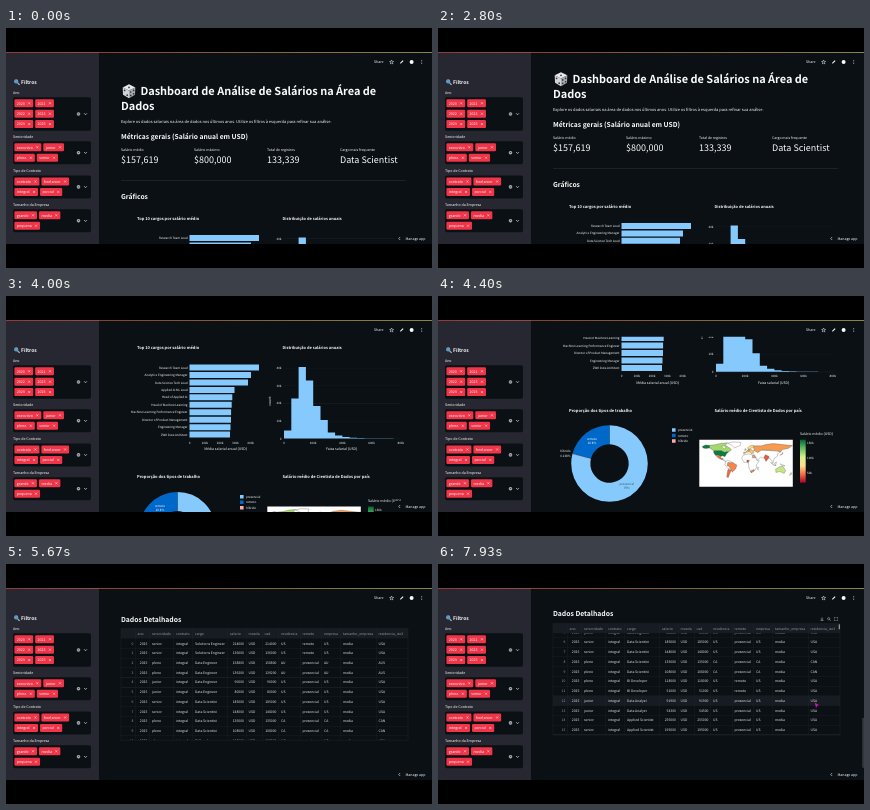
These frames come from a looping animation (426x240 px, 8 s). An HTML page with a canvas:

```html
<!DOCTYPE html>
<html lang="pt">
<head>
<meta charset="utf-8">
<title>Dashboard de Salários</title>
<style>
html, body { margin: 0; width: 100%; height: 100%; overflow: hidden; background: #000; }
canvas { display: block; width: 426px; height: 240px; }
</style>
</head>
<body>
<canvas id="stage"></canvas>
<script>
const W = 426, H = 240, LOOP = 8000, TOP = 24, BOTTOM = 216;
const FONT = '"Noto Sans CJK JP", "Noto Sans CJK SC", "Noto Sans CJK", "Open Sans", sans-serif';
const BG = '#0a1014', SIDE = '#262730', WHITE = '#fafafa', GREY = '#9a9ca5', LINE = '#232930';
const SKY = '#85c9fd', BLUE = '#0068c9', PINK = '#ffabab', RED = '#f03549';

const canvas = document.getElementById('stage');
const dpr = window.devicePixelRatio || 1;
canvas.width = W * dpr;
canvas.height = H * dpr;
const ctx = canvas.getContext('2d');

// Text is laid out at 100px and scaled down, so small sizes keep exact advances.
function setFont(bold) {
  ctx.font = `${bold ? 700 : 400} 100px ${FONT}`;
  ctx.textRendering = 'geometricPrecision';
}
function textWidth(str, size) {
  setFont(false);
  return ctx.measureText(str).width * size / 100;
}
// y is the middle of the capitals
function text(str, x, y, size, { color = WHITE, bold = false, align = 'left', turn = 0 } = {}) {
  ctx.save();
  ctx.translate(x, y);
  ctx.rotate(turn);
  ctx.scale(size / 100, size / 100);
  setFont(bold);
  ctx.textAlign = align;
  ctx.fillStyle = color;
  ctx.fillText(str, 0, 36);
  ctx.restore();
}
function rect(x, y, w, h, color, radius = 0) {
  ctx.fillStyle = color;
  ctx.beginPath();
  ctx.roundRect(x, y, w, h, radius);
  ctx.fill();
}
function circle(x, y, r, color) {
  ctx.fillStyle = color;
  ctx.beginPath();
  ctx.arc(x, y, r, 0, 7);
  ctx.fill();
}
function shape(path, x, y, { fill, stroke, width = 0.6, sx = 1, sy = sx } = {}) {
  ctx.save();
  ctx.translate(x, y);
  ctx.scale(sx, sy);
  const p = new Path2D(path);
  if (fill) { ctx.fillStyle = fill; ctx.fill(p); }
  if (stroke) { ctx.strokeStyle = stroke; ctx.lineWidth = width; ctx.stroke(p); }
  ctx.restore();
}
function clipped(x, y, w, h, draw) {
  ctx.save();
  ctx.beginPath();
  ctx.rect(x, y, w, h);
  ctx.clip();
  draw();
  ctx.restore();
}

// Monotone cubic through [time, value] keys
function track(keys, t) {
  const last = keys.length - 1;
  if (t <= keys[0][0]) return keys[0][1];
  if (t >= keys[last][0]) return keys[last][1];
  const slope = i => (keys[i + 1][1] - keys[i][1]) / (keys[i + 1][0] - keys[i][0]);
  const tangent = i => {
    if (i === 0 || i === last) return 0;
    const a = slope(i - 1), b = slope(i);
    return a * b > 0 ? 2 * a * b / (a + b) : 0;
  };
  const i = keys.findIndex((k, n) => n < last && t < keys[n + 1][0]);
  const [t0, v0] = keys[i], [t1, v1] = keys[i + 1];
  const d = t1 - t0, u = (t - t0) / d, u2 = u * u, u3 = u2 * u;
  return v0 * (2 * u3 - 3 * u2 + 1) + v1 * (3 * u2 - 2 * u3) +
    d * (tangent(i) * (u3 - 2 * u2 + u) + tangent(i + 1) * (u3 - u2));
}
const PAGE_SCROLL = [[2600, 0], [2800, 12], [3530, 69.5], [4400, 205], [5070, 302], [5800, 394.5]];
const TABLE_SCROLL = [[6960, 0], [7200, 9], [7700, 42], [7930, 54.4]];

const FILTERS = [
  { label: 'Ano', y: 65, rows: [['2020', '2021'], ['2022', '2023'], ['2024', '2025']] },
  { label: 'Senioridade', y: 109, rows: [['executivo', 'junior'], ['pleno', 'senior']] },
  { label: 'Tipo de Contrato', y: 143.2, rows: [['contrato', 'freelancer'], ['integral', 'parcial']] },
  { label: 'Tamanho da Empresa', y: 177, rows: [['grande', 'media'], ['pequena']] },
];

function drawSidebar() {
  rect(0, TOP, 93, BOTTOM - TOP, SIDE);
  shape('M1 1 3 3', 10.6, 53.8, { stroke: '#b9bec8', width: 1.2 });
  circle(10.2, 53.4, 2.1, '#8fa3b5');
  circle(10.2, 53.4, 1.5, '#3f9fe0');
  text('Filtros', 15, 54, 5, { bold: true });
  for (const { label, y, rows } of FILTERS) {
    const height = rows.length * 10.5 + 2, mid = y + 4.2 + height / 2;
    text(label, 7, y, 3.57);
    rect(7, y + 4.2, 78, height, BG, 2);
    rows.forEach((tags, i) => {
      let x = 8.4;
      const cy = y + 10.3 + i * 10.4;
      for (const tag of tags) {
        const w = textWidth(tag, 3.6) + 10.8;
        rect(x, cy - 4, w, 8, RED, 1.2);
        text(tag, x + 2.4, cy, 3.6);
        shape('M-1-1 1 1M1-1-1 1', x + w - 4, cy, { stroke: WHITE, width: 0.5 });
        x += w + 2;
      }
    });
    circle(72.5, mid, 1.8, '#b4b6bd');
    shape('M-.7-.7 .7 .7M.7-.7-.7 .7', 72.5, mid, { stroke: BG, width: 0.5 });
    shape('M-1.4-.7 0 .8 1.4-.7', 79.5, mid, { stroke: WHITE });
  }
}

function drawDie(x, y) {
  shape('M0-7 6.3-3.8 0-.6-6.3-3.8Z', x, y, { fill: '#e9e9ec' });
  shape('M-6.3-3.8 0-.6V7L-6 3.6Z', x, y, { fill: '#d2d3d8' });
  shape('M6.3-3.8 0-.6V7L6 3.6Z', x, y, { fill: '#a9abb3' });
  for (const [dx, dy] of [[0, -3.8], [-4.4, -0.8], [-1.8, 4], [1.7, 0.8], [4.6, -0.8], [1.7, 4.2], [4.6, 2.6]]) {
    circle(x + dx, y + dy, 0.85, '#34363e');
  }
}

function drawIntro() {
  drawDie(123, 63.2);
  text('Dashboard de Análise de Salários na Área de', 134.5, 63, 10.9, { bold: true });
  text('Dados', 115, 78, 10.9, { bold: true });
  text('Explore os dados salariais na área de dados nos últimos anos. Utilize os filtros à esquerda para refinar sua análise.',
    115, 93.5, 4);
  text('Métricas gerais (Salário anual em USD)', 115, 109, 6.72, { bold: true });
  [['Salário médio', '$157,619'], ['Salário máximo', '$800,000'],
   ['Total de registros', '133,339'], ['Cargo mais frequente', 'Data Scientist']].forEach(([label, value], i) => {
    const x = 115 + i * 73;
    text(label, x, 122, 3.5);
    text(value, x, 131.7, 9);
  });
  rect(115, 152, 285, 0.5, '#30343d');
  text('Gráficos', 115, 169, 6.72, { bold: true });
}

const JOBS = [
  ['Research Team Lead', 69.5], ['Analytics Engineering Manager', 61.5], ['Data Science Tech Lead', 58.5],
  ['Applied AI ML Lead', 45], ['Head of Applied AI', 42.8], ['Head of Machine Learning', 42.2],
  ['Machine Learning Performance Engineer', 41.6], ['Director of Product Management', 41.5],
  ['Engineering Manager', 41], ['ZWK Data Architect', 40.5],
];
const BIN_HEIGHTS = [8, 40, 71.5, 58, 32.5, 18.5, 6, 3, 1.5, 0.9, 0.6, 0.4, 0.3, 0.3, 0.2];

function drawBarCharts() {
  const right = { align: 'right' }, center = { align: 'center' };
  text('Top 10 cargos por salário médio', 131, 190.5, 4, { bold: true });
  JOBS.forEach(([job, length], i) => {
    const y = 210 + i * 7.45;
    text(job, 181.5, y, 3, right);
    rect(183.5, y - 3, length, 6, SKY);
  });
  ['0', '100k', '200k', '300k', '400k'].forEach((s, i) => text(s, 183.5 + i * 15.3, 285.5, 3, center));
  text('Média salarial anual (USD)', 219.5, 291.5, 3.5, center);

  text('Distribuição de salários anuais', 276.5, 190.5, 3.95, { bold: true });
  const base = 281, bin = 7.3;
  ['0', '10k', '20k', '30k', '40k'].forEach((s, i) => {
    const y = base - i * 17.6;
    rect(278, y, 117, 0.3, '#1a2026');
    text(s, 275.5, y, 3, right);
  });
  const outline = BIN_HEIGHTS.map((h, i) => `V${-h}H${(i + 1) * bin}`).join('');
  shape(`M0 0${outline}V0Z`, 278, base, { fill: SKY });
  text('count', 264, 243.5, 3.5, { align: 'center', turn: -Math.PI / 2 });
  ['0', '200k', '400k', '600k', '800k'].forEach((s, i) => text(s, 278 + i * 4 * bin, 285.5, 3, center));
  text('Faixa salarial (USD)', 335.5, 291.5, 3.5, center);
}

function drawDonut() {
  const cx = 171.5, cy = 372.7, center = { align: 'center' };
  text('Proporção dos tipos de trabalho', 131, 319.5, 4, { bold: true });
  for (const [from, to, color] of [[0, 0.79, SKY], [0.79, 0.7925, PINK], [0.7925, 1, BLUE]]) {
    const angle = f => (f - 0.25) * 2 * Math.PI;
    ctx.beginPath();
    ctx.arc(cx, cy, 38.3, angle(from), angle(to));
    ctx.arc(cx, cy, 19.2, angle(to), angle(from), true);
    ctx.fillStyle = color;
    ctx.fill();
  }
  text('remoto', 154, 348, 3, center);
  text('20.8%', 154, 352, 3, center);
  text('presencial', 188.7, 392.6, 3, { align: 'center', color: '#33566f' });
  text('79%', 188.7, 396.6, 3, { align: 'center', color: '#33566f' });
  text('híbrido', 132.5, 360.5, 3, { align: 'right' });
  text('0.238%', 132.5, 364.6, 3, { align: 'right' });
  [['presencial', SKY], ['remoto', BLUE], ['híbrido', PINK]].forEach(([name, color], i) => {
    rect(234, 337.5 + i * 5.5, 3.6, 3.4, color);
    text(name, 240, 339.2 + i * 5.5, 3);
  });
}

// Outlines in degrees of longitude and latitude
const LANDS = [
  ['#fff', 'M-52 83-20 82-22 70-44 60-54 70-70 78Z'],
  ['#a4d86e', 'M-141 70-120 72-95 78-70 80-80 70-62 60-56 52-66 45-83 43-95 49-124 49-140 60ZM-95 66-82 56-78 62-85 68Z'],
  ['#0b7d42', 'M-168 66-156 71-141 70-140 60-155 58-165 60Z'],
  ['#0b7d42', 'M-124 49-95 49-83 43-67 46-76 36-81 26-90 30-97 27-106 32-118 33-124 41Z'],
  ['#f3703f', 'M-117 32-106 31-97 26-96 19-88 21-92 15-105 20Z'],
  ['#fff', 'M-92 15-84 15-78 8-81 8-88 13Z'],
  ['#fff', 'M-78 8-72 12-60 9-50 3-58-22-70-18-81-5Z'],
  ['#f6874a', 'M-70 4-50 3-35-6-40-21-53-33-58-22-66-10-73-8Z'],
  ['#ef6a3d', 'M-69-22-57-26-63-40-68-54-74-52-71-30Z'],
  ['#fff', 'M-17 21-10 33 10 37 32 31 43 11 51 11 40-5 40-16 32-28 20-35 12-18 9 3-8 5Z'],
  ['#e1472f', 'M3 13 13 13 9 4 4 6Z'],
  ['#f79a52', 'M25 31 34 31 36 22 25 22Z'],
  ['#f6874a', 'M17-29 30-23 32-28 20-35Z'],
  ['#fff', 'M44-13 50-16 46-25 44-20Z'],
  ['#fff', 'M28 50 60 52 90 50 135 46 122 38 121 28 108 20 104 2 98 12 90 22 72 20 57 25 45 13 35 30 27 38Z'],
  ['#f79a52', 'M28 68 60 68 75 73 105 77 140 73 179 69 162 58 140 54 133 44 118 50 90 51 60 52 45 42 32 50Z'],
  ['#e85b38', 'M69 25 75 34 89 27 87 21 77 8Z'],
  ['#fbc26a', 'M-9 37-9 43-1 44 8 54 20 54 30 46 22 37 13 45 3 43Z'],
  ['#b6dd73', 'M-5 50-3 58 1 53ZM7 48 10 54 15 51 13 48Z'],
  ['#fde08a', 'M5 59 14 68 28 70 30 61 22 60 14 56Z'],
  ['#f79a52', 'M130 32 140 36 142 43 139 37Z'],
  ['#fff', 'M95 5 105-6 116-8 104-2ZM109 1 117 6 115-4ZM131-1 150-9 138-8Z'],
  ['#c7e67f', 'M114-22 130-12 142-11 153-27 147-38 131-31 115-34Z'],
  ['#fde08a', 'M172-35 178-38 168-46Z'],
];

function drawMap() {
  text('Salário médio de Cientista de Dados por país', 276.5, 319.5, 4, { bold: true });
  rect(261.3, 349, 93.5, 47, '#fff');
  for (const [fill, path] of LANDS) {
    shape(path, 308, 372.7, { fill, stroke: '#444', width: 1.1, sx: 0.26, sy: -0.26 });
  }
  text('Salário médio (USD)', 362, 343, 3.5);
  const scale = ctx.createLinearGradient(0, 349, 0, 392);
  ['#006837', '#66bd63', '#d9ef8b', '#fee08b', '#f46d43', '#a50026']
    .forEach((color, i) => scale.addColorStop(i / 5, color));
  rect(362, 349, 5.7, 43, scale);
  ['150k', '100k', '50k'].forEach((s, i) => text(s, 369, 352.5 + i * 15, 3));
}

const COLUMNS = [
  ['', 125], ['ano', 131.5], ['senioridade', 146], ['contrato', 170], ['cargo', 189], ['salario', 224],
  ['moeda', 242.5], ['usd', 258.5], ['residencia', 275], ['remoto', 296.5], ['empresa', 318],
  ['tamanho_empresa', 337], ['residencia_iso3', 372.5],
];
const NUMERIC_RIGHT = { 0: 127.3, 1: 141.3, 5: 238, 7: 270.5 };
const ISO = { US: 'USA', AU: 'AUS', CA: 'CAN' };
const ROWS = [
  ['senior', 'Solutions Engineer', 214000, 'US', 'remoto'], ['senior', 'Solutions Engineer', 136000, 'US', 'remoto'],
  ['pleno', 'Data Engineer', 158800, 'AU'], ['pleno', 'Data Engineer', 139200, 'AU'],
  ['junior', 'Data Engineer', 90000, 'US'], ['junior', 'Data Engineer', 80000, 'US'],
  ['senior', 'Data Scientist', 185000, 'US'], ['senior', 'Data Scientist', 148000, 'US'],
  ['pleno', 'Data Scientist', 135000, 'CA'], ['pleno', 'Data Scientist', 108000, 'CA'],
  ['pleno', 'BI Developer', 118000, 'US', 'remoto'], ['pleno', 'BI Developer', 51000, 'US', 'remoto'],
  ['junior', 'Data Analyst', 91900, 'US'], ['junior', 'Data Analyst', 54300, 'US'],
  ['senior', 'Applied Scientist', 255000, 'US'], ['senior', 'Applied Scientist', 195000, 'US'],
  ['pleno', 'Applied Scientist', 172000, 'US'],
];
const PITCH = 9.73, HEAD = 459, BODY = 463.8, TABLE_END = 565.5;

function drawTable(scroll, hover) {
  text('Dados Detalhados', 115, 444.5, 6.8, { bold: true });
  clipped(115, BODY, 287, TABLE_END - BODY, () => {
    ROWS.forEach(([level, job, pay, country, mode = 'presencial'], r) => {
      const y = BODY + 4.9 + r * PITCH - scroll;
      if (hover && Math.abs(y - 535.8) < PITCH / 2) rect(115, y - PITCH / 2, 287, PITCH, '#161c21');
      const cells = [r, 2025, level, 'integral', job, pay, 'USD', pay, country, mode, country, 'media', ISO[country]];
      cells.forEach((cell, c) => {
        const numeric = c in NUMERIC_RIGHT;
        text(String(cell), numeric ? NUMERIC_RIGHT[c] : COLUMNS[c][1], y, 3.4,
          { color: c ? '#e6e7ea' : GREY, align: numeric ? 'right' : 'left' });
      });
      rect(115, y + PITCH / 2, 287, 0.3, LINE);
    });
  });
  rect(115, 454.2, 287, BODY - 454.2, '#171b22');
  COLUMNS.forEach(([name, x], c) => {
    text(name, x, HEAD, 3.4, { color: GREY });
    if (c) rect(x - 2.3, 454.2, 0.3, TABLE_END - 454.2, LINE);
  });
  ctx.strokeStyle = LINE;
  ctx.lineWidth = 0.4;
  ctx.strokeRect(115, 454.2, 287, TABLE_END - 454.2);
}

function drawTableTools(alpha) {
  const pen = { stroke: '#c8cad0', width: 0.5 };
  ctx.globalAlpha = alpha;
  shape('M0-1.6V.6M-1-.3 0 .7 1-.3M-1.5 1.5H1.5', 384, 449.5, pen);
  shape('M.5.5 1.7 1.7M.8-.3A1.1 1.1 0 1 1-1.4-.3A1.1 1.1 0 1 1 .8-.3', 391, 449.5, pen);
  shape('M-1.6-.5V-1.5H-.5M.5-1.5H1.6V-.5M1.6.5V1.5H.5M-.5 1.5H-1.6V.5', 398, 449.5, pen);
  rect(400.8, 454.8, 0.9, 5, '#c8cad0', 0.4);
  ctx.globalAlpha = 1;
}

function drawToolbar() {
  const pen = { stroke: WHITE, width: 0.5 };
  text('Share', 368, 34, 3.5);
  shape('M0-2 .6-.6 2-.5 .9.5 1.3 1.9 0 1.1-1.3 1.9-.9.5-2-.5-.6-.6Z', 385.6, 34, pen);
  shape('M-1.6 1.7-1.3.5 1-1.8 1.8-1-.5 1.3Z', 395.7, 34, { fill: WHITE });
  circle(405.6, 34, 2, WHITE);
  for (const dy of [-1.5, 0, 1.5]) circle(415.8, 34 + dy, 0.45, WHITE);
  const stripe = ctx.createLinearGradient(0, 0, W, 0);
  stripe.addColorStop(0, '#ff4b4b');
  stripe.addColorStop(1, '#fffd80');
  rect(0, TOP, W, 0.5, stripe);
  rect(388, 205, 38, 11, BG, 1.5);
  shape('M.7-1.5-.8 0 .7 1.5', 393.5, 210.5, { stroke: WHITE });
  text('Manage app', 399.5, 210.5, 3.5);
}

function draw(t) {
  const scroll = track(PAGE_SCROLL, t);
  const tools = track([[6750, 0], [7050, 1]], t);
  ctx.setTransform(dpr, 0, 0, dpr, 0, 0);
  rect(0, 0, W, H, '#000');
  clipped(0, TOP, W, BOTTOM - TOP, () => {
    rect(0, TOP, W, BOTTOM - TOP, BG);
    clipped(93, 40.7, W - 93, BOTTOM - 40.7, () => {
      ctx.translate(0, -scroll);
      drawIntro();
      drawBarCharts();
      drawDonut();
      drawMap();
      drawTable(track(TABLE_SCROLL, t), t > 6850);
      drawTableTools(tools);
    });
    drawSidebar();
    drawToolbar();
    if (t > 6130) rect(424.6, 154, 0.9, 50, '#5a5d66', 0.4);
    if (t > 6500) {
      const x = track([[6500, 428], [6900, 377]], t), y = track([[6500, 160], [6900, 139]], t);
      shape('M0 0 3.6 2.2 1.9 2.6 1.2 4.4Z', x, y, { fill: '#d916c8', stroke: '#d916c8', width: 0.4 });
    }
  });
}

function tick() {
  draw(performance.now() % LOOP);
  requestAnimationFrame(tick);
}
tick();
</script>
</body>
</html>
```
